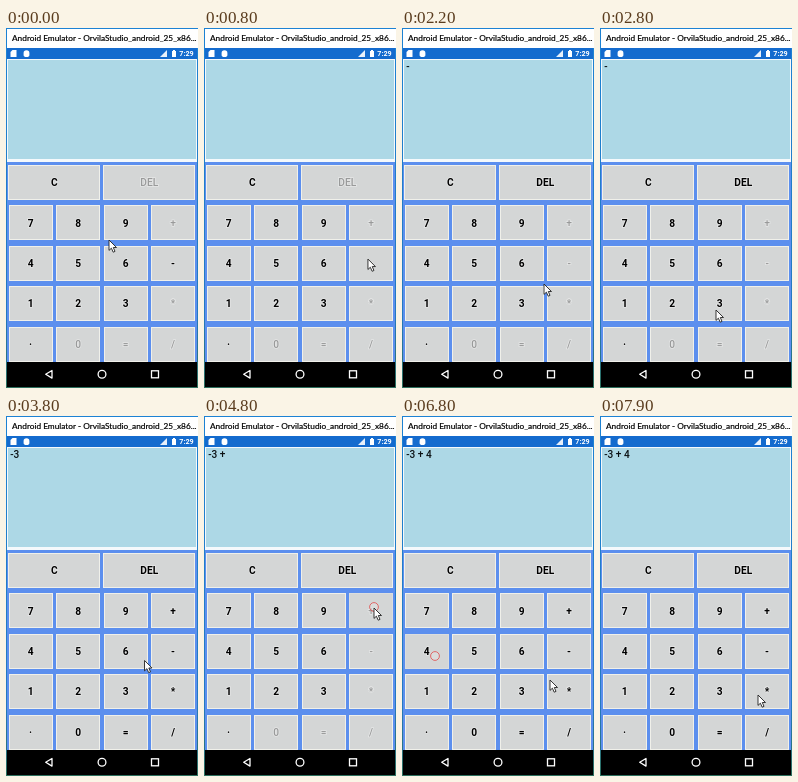
Recreate the animation shown at these times as an HTML page. Size 192 px wide and 360 px high, loop 8 s.

```html
<!DOCTYPE html>
<html lang="en">
<head>
<meta charset="utf-8">
<title>Calculator</title>
<style>
  html, body { margin: 0; width: 100%; height: 100%; overflow: hidden; background: #fff; }
  svg { display: block; width: 192px; height: 360px; }
  text { font-family: Roboto, Arial, sans-serif; }
  .title { font: 8.3px Lato, "Open Sans", sans-serif; fill: #000; stroke: #000; stroke-width: .2; }
  .key { font-size: 10.2px; font-weight: 700; text-anchor: middle; fill: #000;
         stroke: #e6e7e7; stroke-width: 1.6; paint-order: stroke; }
  .off { fill: #999a9a; font-weight: 500; }
  .rim { fill: #f0f0ea; }
  .pressed { fill: #dcdede; }
</style>
</head>
<body>
<svg viewBox="0 0 192 360" xmlns="http://www.w3.org/2000/svg">
  <defs>
    <linearGradient id="edge" x1="0" y1="0" x2="0" y2="1">
      <stop offset="0" stop-color="#1c82d4"/>
      <stop offset=".8" stop-color="#2579c0"/>
      <stop offset="1" stop-color="#2c6f5c"/>
    </linearGradient>
  </defs>
  <rect width="192" height="360" fill="url(#edge)"/>
  <rect x="1" y="1" width="191" height="19" fill="#fff"/>
  <text class="title" x="6" y="13.4">Android Emulator - OrvilaStudio_android_25_x86...</text>

  <rect x="1" y="20" width="190" height="11" fill="#146bce"/>
  <path d="M6.5 22h4v7h-6v-5z" fill="#fff"/>
  <path d="M17.6 25a2.9 2.7 0 0 1 5.8 0v2a2.9 2 0 0 1-5.8 0z" fill="#fff"/>
  <path d="M161 22v7h-7z" fill="#fff" opacity=".9"/>
  <path d="M166 23h1v-1h2v1h1v6h-4z" fill="#fff"/>
  <text x="173.3" y="28.3" font-size="7.2" font-weight="700" fill="#fff">7:29</text>

  <rect x="1" y="31" width="190" height="303" fill="#5c8fee"/>
  <rect x="1" y="31" width="190" height="103" fill="#f4f9fc"/>
  <rect x="2" y="32" width="188" height="99" fill="#add8e6"/>
  <text id="entry" x="4.2" y="41.7" font-size="10.1" font-weight="500" fill="#0b1114" xml:space="preserve"></text>
  <g id="keys"></g>

  <rect x="1" y="334" width="190" height="25" fill="#000"/>
  <g fill="none" stroke="#fff" stroke-width="1.3">
    <path d="M46 342.5v7.6l-6.3-3.8z" stroke-linejoin="round"/>
    <circle cx="96" cy="346.3" r="3.9"/>
    <rect x="145.5" y="342.8" width="7" height="7"/>
  </g>

  <circle id="ring" r="4.4" fill="#fff" fill-opacity=".15" stroke="#e05a5a" stroke-width=".9"/>
  <path id="pointer" d="M0 0V10.4L2.4 8.2L4.2 12.2L6 11.4L4.3 7.5H7.5Z" fill="#fff" stroke="#222" stroke-width=".9" stroke-linejoin="round"/>
</svg>
<script>
const LOOP = 8000;
const NS = "http://www.w3.org/2000/svg";
const byId = id => document.getElementById(id);
const entry = byId("entry"), keys = byId("keys"), ring = byId("ring"), pointer = byId("pointer");
const labels = {}, rims = {};

function add(tag, attrs) {
  const el = document.createElementNS(NS, tag);
  for (const name in attrs) el.setAttribute(name, attrs[name]);
  keys.appendChild(el);
  return el;
}

function addKey(label, cx, cy, width) {
  const height = 35;
  const x = Math.round(cx - width / 2), y = Math.round(cy - height / 2);
  rims[label] = add("rect", { class: "rim", x, y, width, height });
  add("rect", { x: x + 1, y: y + 1, width: width - 2, height: height - 2, fill: "#d4d6d6" });
  labels[label] = add("text", { class: "key", x: cx, y: cy + 3.7 });
  labels[label].textContent = label;
}

addKey("C", 48.3, 154.5, 92);
addKey("DEL", 143.3, 154.5, 92);
["789+", "456-", "123*", "·0=/"].forEach((row, r) =>
  [...row].forEach((label, c) => addKey(label, 24.6 + c * 47.5, 194.9 + r * 40.4, 44)));

// Pointer stops: time, x, y
const path = [
  [0, 103, 212], [150, 104, 213], [900, 167, 232], [1800, 167, 232],
  [2600, 117, 280], [2800, 116, 282], [3400, 116, 282],
  [4300, 170, 192], [5000, 170, 192], [5750, 34, 243],
  [6520, 33, 243], [6800, 148, 264], [7100, 158, 279], [8000, 158, 279]
];

// Taps: time, key, x, y
const taps = [
  [1150, "-", 167, 231], [3050, "3", 116, 281],
  [4600, "+", 170, 191], [6450, "4", 33, 240]
];
const TAP_TIME = 400;

// Entry text and the keys that are unavailable with it
const states = [
  [0, "", ["DEL", "+", "*", "/", "0", "="]],
  [1250, "-", ["+", "-", "*", "/", "0", "="]],
  [3200, "-3", []],
  [4700, "-3 +", ["+", "-", "*", "/", "0", "="]],
  [6550, "-3 + 4", []]
];

const ease = p => p * p * (3 - 2 * p);

function pointerAt(t) {
  const i = path.findIndex(stop => stop[0] > t);
  const [t0, x0, y0] = path[i - 1], [t1, x1, y1] = path[i];
  const p = ease((t - t0) / (t1 - t0));
  return [x0 + (x1 - x0) * p, y0 + (y1 - y0) * p];
}

function draw(t) {
  const [, text, off] = states.filter(s => s[0] <= t).pop();
  const tap = taps.find(([start]) => t >= start && t < start + TAP_TIME);
  entry.textContent = text;
  for (const label in labels) {
    labels[label].classList.toggle("off", off.includes(label));
    rims[label].classList.toggle("pressed", !!tap && tap[1] === label);
  }

  ring.setAttribute("visibility", tap ? "visible" : "hidden");
  if (tap) {
    ring.setAttribute("cx", tap[2]);
    ring.setAttribute("cy", tap[3]);
  }
  pointer.setAttribute("transform", `translate(${pointerAt(t)})`);
}

const start = performance.now();
function tick() {
  const t = (performance.now() - start) % LOOP;
  draw(Math.floor(t / 100) * 100);
  requestAnimationFrame(tick);
}
draw(0);
requestAnimationFrame(tick);
</script>
</body>
</html>
```
